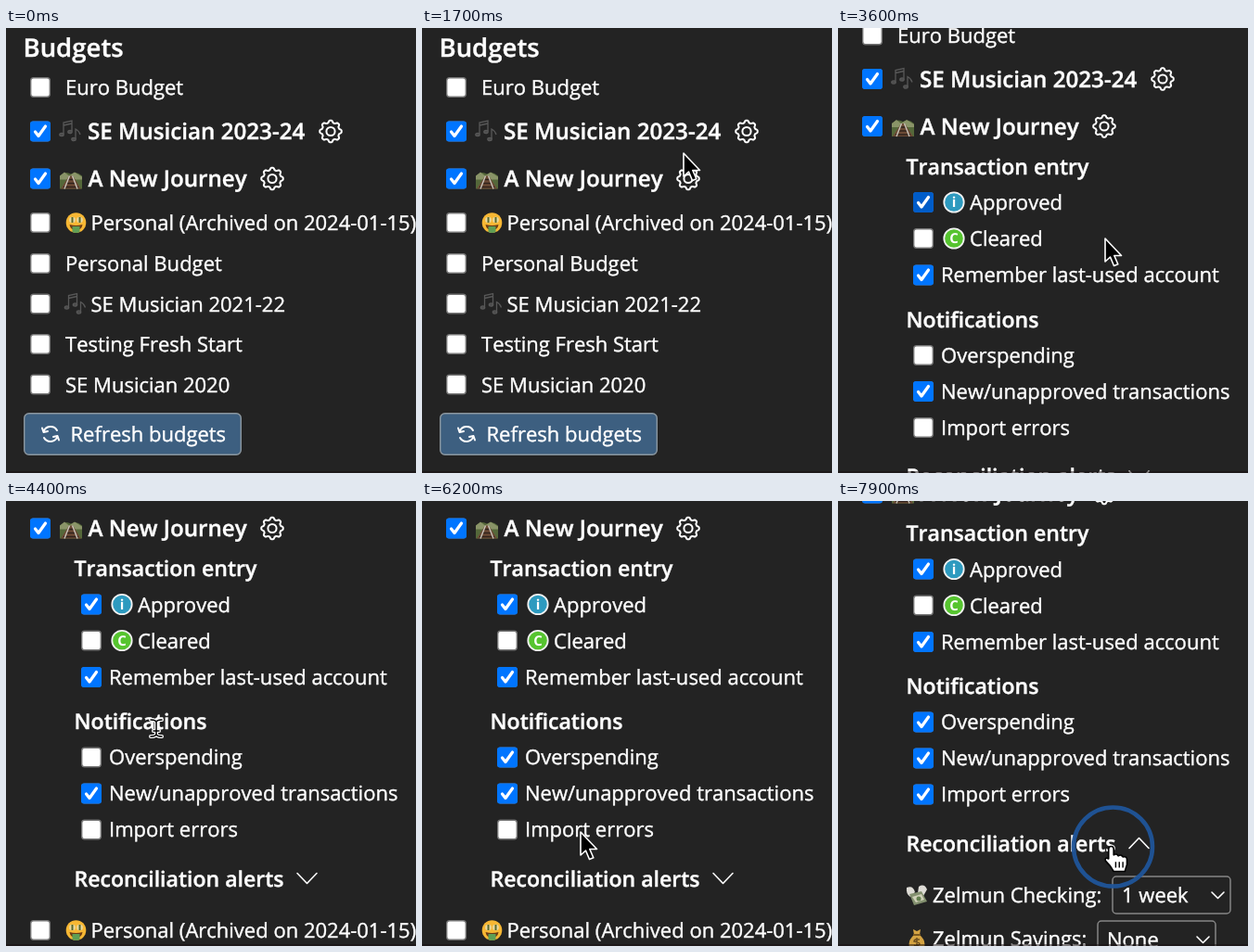
An HTML page for the animation above (8000 ms loop, 442x480 px).

```html
<!DOCTYPE html>
<html lang="en">
<head>
<meta charset="utf-8">
<title>Budget settings</title>
<style>
  html, body { margin: 0; width: 100%; height: 100%; overflow: hidden; background: #232323; }
  svg { display: block; }
  text {
    font: 22px "Open Sans", "Noto Sans", sans-serif; font-kerning: none; text-rendering: geometricPrecision;
    fill: #fff; stroke: #fff; stroke-width: .4px;
  }
  .title { font-size: 27.5px; font-weight: 600; }
  .budget { font-size: 24.2px; font-weight: 600; }
  .head { font-size: 23.1px; font-weight: 600; }
  .badge { font-size: 15px; font-weight: 700; text-anchor: middle; stroke: none; }
  .line { fill: none; stroke: #fff; stroke-width: 2; stroke-linecap: round; stroke-linejoin: round; }
  .thin { stroke-width: 1.6; }
  .box { fill: #fff; stroke: #767676; stroke-width: 1.4; }
  .tick { visibility: hidden; }
  .on .tick { visibility: visible; }
  .fill { fill: #0075ff; }
  .hover .fill { fill: #005cc8; }
  .select { fill: #232323; stroke: #858585; stroke-width: 1.5; }
</style>
</head>
<body>
<svg id="stage" width="442" height="480" viewBox="0 0 442 480">
  <defs>
    <g id="notes" fill="#4c4c4c" stroke="#585858" stroke-width="1.3">
      <path d="M-8 3V-9L1 -11V0M-8 -6L1 -8M5 9V-2Q9 0 10 4" fill="none"/>
      <ellipse cx="-10" cy="4" rx="2.2" ry="1.6"/>
      <ellipse cx="-1" cy="1" rx="2.2" ry="1.6"/>
      <ellipse cx="3" cy="9" rx="2.2" ry="1.6"/>
    </g>
    <g id="track">
      <path d="M-12 -4Q-6 -10 0 -6Q6 -10 12 -4V10H-12Z" fill="#55683a"/>
      <path d="M-12 -4L-7 -8L-2 -4L4 -8L12 -3V0H-12Z" fill="#8a9468"/>
      <path d="M-2 -4H2L11 10H-11Z" fill="#6b4a35"/>
      <path d="M-3 0H3M-5 4H5M-8 8H8" stroke="#30231d" stroke-width="1.6"/>
      <path d="M-1.5 -4L-7 10M1.5 -4L7 10" stroke="#c9c4ba" stroke-width="1.4"/>
    </g>
    <g id="face">
      <circle r="10.8" fill="#f7b733"/>
      <path d="M-7 2Q0 4 7 2Q6 8 0 8Q-6 8 -7 2Z" fill="#6b3a16"/>
      <path d="M-4 4H4V10Q0 12 -4 10Z" fill="#5f9e55"/>
      <circle cx="-4" cy="-3" r="3.3" fill="#ead9a0"/>
      <circle cx="4" cy="-3" r="3.3" fill="#ead9a0"/>
      <path d="M-4 -6V0M4 -6V0" stroke="#5a6a2c" stroke-width="2"/>
    </g>
    <g id="wings">
      <path d="M-11 -8Q-4 -11 -2 -3L-7 2Q-12 -1 -11 -8ZM2 -9Q8 -13 11 -6L7 1L1 -2Z" fill="#dedcd6"/>
      <path d="M-8 -1L5 -4L11 7L-3 11Z" fill="#83906f"/>
      <path d="M-5 2L5 -1L8 5L-1 8Z" fill="#cfd0b8"/>
      <circle cx="2" cy="4" r="2.5" fill="#64804f"/>
    </g>
    <g id="bag">
      <path d="M-4 -10L0 -8L4 -10L3 -4Q10 2 8 9Q0 13 -8 9Q-10 2 -3 -4Z" fill="#d5a443"/>
      <path d="M-4 -4H4" stroke="#7d5a20" stroke-width="2"/>
      <path d="M0 -1V9M3 1Q-3 0 -3 3Q3 4 3 6Q0 9 -3 7" fill="none" stroke="#6e5020" stroke-width="1.5"/>
    </g>
  </defs>
  <g id="page"></g>
  <rect y="478" width="442" height="2" fill="#160f11" opacity=".5"/>
  <circle id="ring" fill="none" stroke="#1f5599" stroke-width="4.6" opacity=".95"/>
  <g id="pointer" stroke-linejoin="round">
    <path id="arrow" d="M0 0V25L5.5 20L9.5 29.5L13.8 27.7L9.8 18.500H17.5Z" fill="#000" stroke="#fff" stroke-width="1.6"/>
    <g id="beam" fill="none" stroke-linecap="round">
      <path d="M-6 -9Q0 -9 0 -6V6Q0 9 -6 9M6 -9Q0 -9 0 -6M0 6Q0 9 6 9M-3 3H3" stroke="#fff" stroke-width="4"/>
      <path d="M-6 -9Q0 -9 0 -6V6Q0 9 -6 9M6 -9Q0 -9 0 -6M0 6Q0 9 6 9M-3 3H3" stroke="#000" stroke-width="1.5"/>
    </g>
    <g id="hand" transform="translate(-1.5 -.5) scale(1.1 1.04)">
      <path d="M-3 3Q-3 0 -.5 0Q2 0 2 3V9Q5 7 6.5 10Q9.5 8 11 11Q15 10 15 14V19Q14 22 13 26H2Q-1 20 -6 15Q-7 11 -3 13Z" fill="#fff" stroke="#000" stroke-width="1.5"/>
      <path d="M4 16V22M7.5 16V22M11 16V22" stroke="#000" stroke-width="1.3"/>
    </g>
  </g>
</svg>
<script>
const $ = id => document.getElementById(id);
const LOOP = 8000, STEP = 100, PANEL_H = 386;

const text = (x, y, s, cls = '') => `<text x="${x}" y="${y}" class="${cls}">${s}</text>`;
const icon = (name, x, y) => `<use href="#${name}" x="${x}" y="${y}"/>`;
const check = (x, y, on, id = '') => `<g id="${id}" class="${on ? 'on' : ''}" transform="translate(${x} ${y})">
  <rect class="box" x="-10.3" y="-10.3" width="20.6" height="20.6" rx="3"/>
  <g class="tick"><rect class="fill" x="-11" y="-11" width="22" height="22" rx="3"/>
  <path class="line" style="stroke-width:3.2" d="M-5.5 .5L-2 5L5.5 -5.5"/></g></g>`;

function gear(x, y) {
  const pts = Array.from({ length: 96 }, (_, i) => {
    const a = i / 96 * 2 * Math.PI, r = 10.6 + 1.2 * Math.tanh(2 * Math.cos(8 * a));
    return (x + r * Math.cos(a)).toFixed(2) + ',' + (y + r * Math.sin(a)).toFixed(2);
  });
  return `<polygon class="line" points="${pts.join(' ')}"/><circle class="line" cx="${x}" cy="${y}" r="4.6"/>`;
}

const badge = (y, color, s) => `<circle cx="125" cy="${y}" r="10.7" fill="${color}" stroke="#f2f2f2" stroke-width="1.8"/>` +
  text(125, y + 5.4, s, 'badge');
const row = (y, s, x = 64, emoji) => check(37, y, false) + (emoji ? icon(emoji, 75.5, y) : '') + text(x, y + 8, s);
const option = (y, s, on, id) => check(92, y, on, id) + text(111, y + 7.7, s);
const select = (x, y, s) => `<rect class="select" x="${x}" y="${y - 20}" width="127" height="40" rx="4"/>` +
  text(x + 10, y + 8, s) + `<path class="line thin" d="M${x + 107} ${y - 3}l6.5 6.5l6.5 -6.5"/>`;

const refresh = `<rect x="19.7" y="415.7" width="233.6" height="44.6" rx="5" fill="#3d5f80" stroke="#8c979f" stroke-width="1.4"/>
  <path class="line" d="M40.5 435.5A8 8 0 0 1 55 434M55.5 440.5A8 8 0 0 1 41 442M39 431.5L40.5 436L45 435M57 444.5L55.5 440L51 441"/>` +
  text(69.5, 446, 'Refresh budgets');

$('page').innerHTML =
  text(18.5, 31, 'Budgets', 'title') +
  row(64, 'Euro Budget') +
  check(37, 111.5, true) + icon('notes', 70, 111) + text(88, 120, 'SE Musician 2023-24', 'budget') + gear(350, 111.5) +
  check(37, 162.5, true) + icon('track', 70, 163.5) + text(88.5, 171, 'A New Journey', 'budget') + gear(287, 162.5) +
  '<g id="panel">' +
    text(73.5, 214, 'Transaction entry', 'head') +
    check(92, 244.5, true, 'approved') + badge(244.5, '#2d9abf', 'i') + text(142, 252.5, 'Approved') +
    check(92, 283.5, false) + badge(283.5, '#56c42f', 'C') + text(142, 291.5, 'Cleared') +
    option(323, 'Remember last-used account', true) +
    text(73.5, 379, 'Notifications', 'head') +
    option(409.5, 'Overspending', false, 'overspend') +
    option(448.5, 'New/unapproved transactions', true) +
    option(487.5, 'Import errors', false, 'errors') +
    text(73.5, 548.5, 'Reconciliation alerts', 'head') +
    '<path id="chevron" class="line thin" d="M-10.5 -5.5L0 5.5L10.5 -5.5"/>' +
    '<g id="alerts">' +
      icon('wings', 85, 596) + text(102, 604, 'Zelmun Checking:') + select(296, 596, '1 week') +
      icon('bag', 85, 643) + text(102, 651, 'Zelmun Savings:') + select(280, 644, 'None') +
    '</g>' +
  '</g>' +
  '<g id="rest">' +
    row(210, 'Personal (Archived on 2024-01-15)', 91.5, 'face') +
    row(254, 'Personal Budget') +
    row(297.5, 'SE Musician 2021-22', 91.5, 'notes') +
    row(341, 'Testing Fresh Start') +
    row(384.5, 'SE Musician 2020') + refresh +
  '</g>';

// time, x, y
const path = [[1200, 450, 60], [1500, 335, 102], [1700, 282, 135], [1900, 287, 160], [3000, 287, 160],
  [3500, 288, 227], [3700, 288, 227], [4200, 170, 240], [4400, 162, 245], [4700, 165, 272], [5600, 165, 272],
  [6200, 171, 357], [6300, 172, 358], [6700, 172, 358], [7100, 311, 330], [7300, 311, 330], [7600, 296.5, 373]];
// time, offset
const scroll = [[3500, 0], [3600, 56.5], [3700, 100], [3800, 122], [3900, 131], [4000, 133],
  [7000, 133], [7100, 147], [7200, 165.5], [7300, 170], [7400, 171]];
// time, pointer shape
const shapes = [[0, 'arrow'], [1900, 'hand'], [3100, 'arrow'], [4200, 'beam'], [4600, 'arrow'], [7500, 'hand']];
const clicks = [2700, 5000, 6500, 7700];

function at(keys, t) {
  const i = keys.findIndex(k => k[0] > t);
  if (i === 0) return keys[0].slice(1);
  if (i < 0) return keys[keys.length - 1].slice(1);
  const a = keys[i - 1], b = keys[i], p = (t - a[0]) / (b[0] - a[0]);
  return a.slice(1).map((v, k) => v + (b[k + 1] - v) * p);
}
const show = (id, on) => $(id).style.display = on ? '' : 'none';
const move = (id, x, y) => $(id).setAttribute('transform', `translate(${x} ${y})`);

function draw(t) {
  const open = t >= 2800, alerts = t >= 7800;
  move('page', 0, -at(scroll, t)[0]);
  show('panel', open);
  show('alerts', alerts);
  show('rest', !alerts);
  move('rest', 0, open ? PANEL_H : 0);
  $('chevron').setAttribute('transform', `translate(324.5 540) scale(1 ${alerts ? -1 : 1})`);
  $('approved').classList.toggle('hover', t >= 3400 && t < 3800);
  $('overspend').classList.toggle('on', t >= 5100);
  $('errors').classList.toggle('on', t >= 6600);

  const [x, y] = at(path, t);
  const shape = shapes.filter(s => s[0] <= t).pop()[1];
  move('pointer', x, y);
  show('pointer', t >= 1200);
  for (const s of ['arrow', 'beam', 'hand']) show(s, s === shape);

  const click = clicks.find(c => t >= c && t < c + 400);
  show('ring', click !== undefined);
  if (click !== undefined) {
    const p = Math.min(1, (t - click + 100) / 300);
    move('ring', x, y);
    $('ring').setAttribute('r', 42.5 * (1 - (1 - p) ** 2));
  }
}

let start;
function tick(now) {
  start ??= now;
  draw(Math.floor((now - start) % LOOP / STEP) * STEP);
  requestAnimationFrame(tick);
}
draw(0);
requestAnimationFrame(tick);
</script>
</body>
</html>
```
